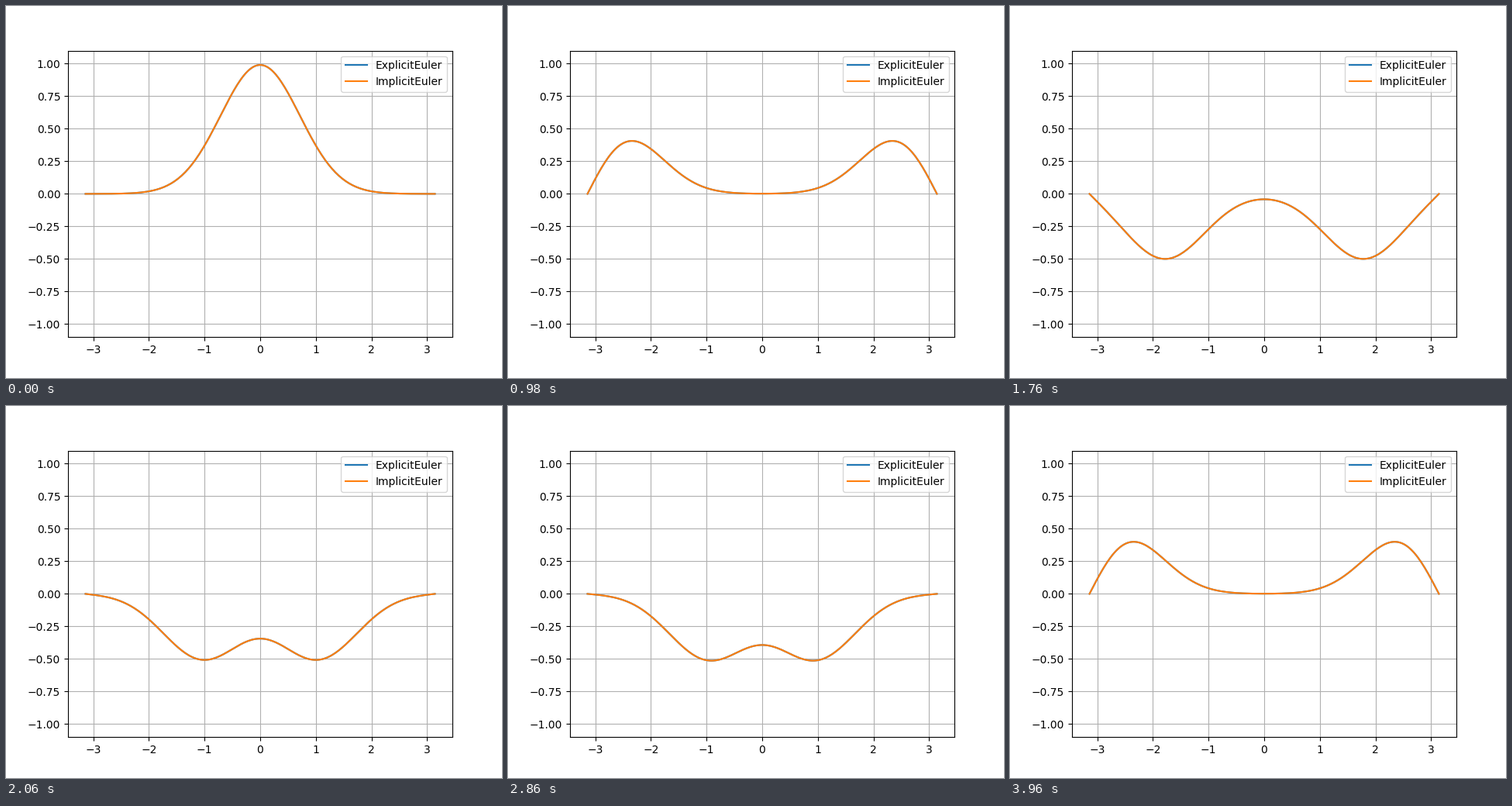
Write a matplotlib script that moves like this. It is 640x480 px and loops after 3.98 s.

```python
import numpy as np
import matplotlib.pyplot as plt
from matplotlib.animation import FuncAnimation

FRAMES = 199
INTERVAL = 20
STEP = 0.05  # distance a wave travels per frame
START = 0.1

x = np.linspace(-np.pi, np.pi, 201)


def pulse(z):
    """Gaussian pulse with its mirrored copies beyond the fixed ends."""
    return sum((-1) ** n * np.exp(-(z - 2 * np.pi * n) ** 2)
               for n in range(-4, 5))


def wave(shift):
    """Two half-height pulses running apart between walls at -pi and pi."""
    return 0.5 * (pulse(x - shift) + pulse(x + shift))


fig, ax = plt.subplots(figsize=(6.4, 4.8), dpi=100)
lines = [ax.plot(x, wave(START), label=name)[0]
         for name in ("ExplicitEuler", "ImplicitEuler")]
ax.set_ylim(-1.1, 1.1)
ax.grid(True)
ax.legend(loc="upper right")


def update(frame):
    u = wave(START + STEP * frame)
    for line in lines:
        line.set_ydata(u)
    return lines


anim = FuncAnimation(fig, update, frames=FRAMES, interval=INTERVAL,
                     repeat=True, repeat_delay=0)
plt.show()
```
